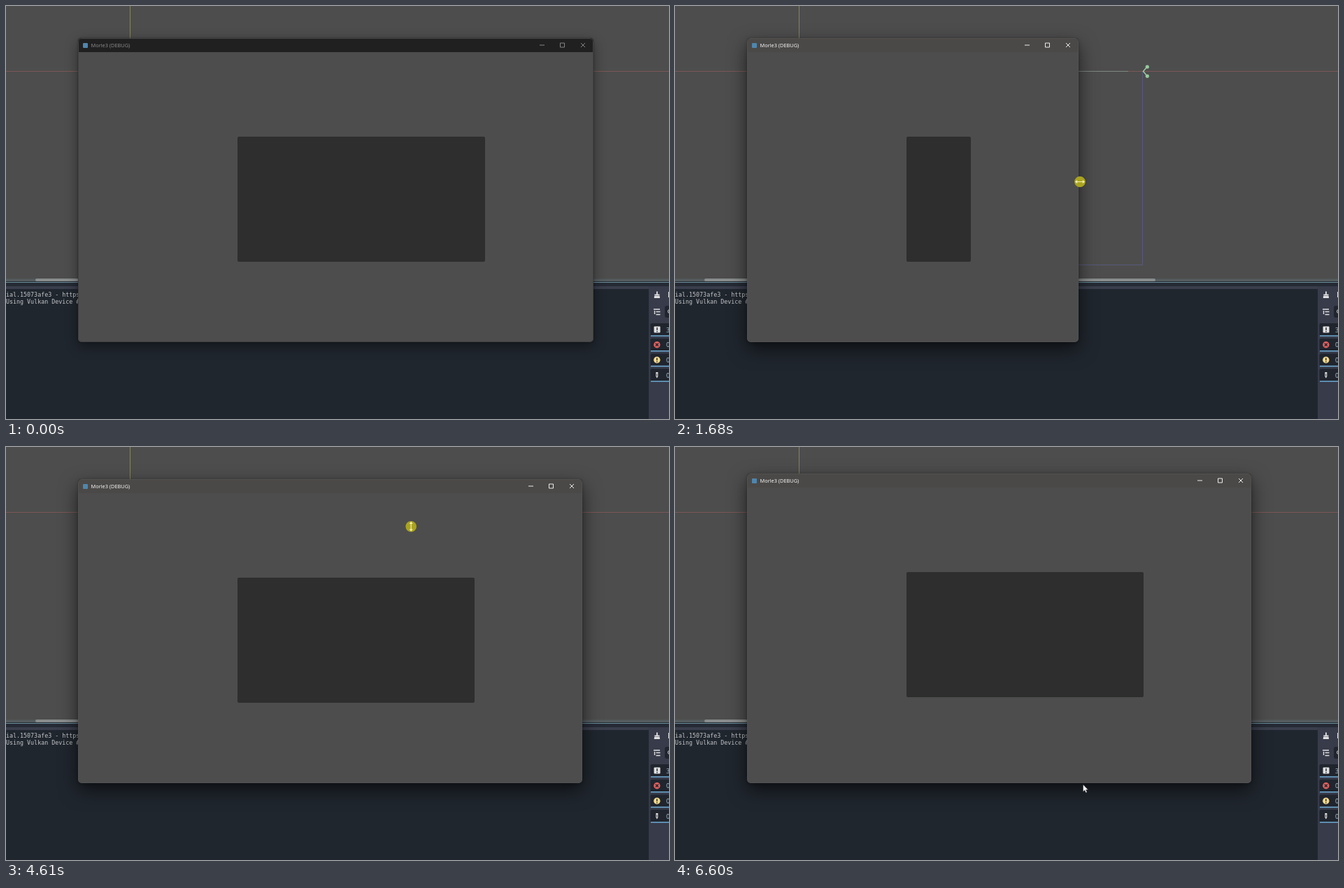
Write an HTML page that moves like this. It is 948 by 591 pixels and loops after 6670 ms.

```html
<!DOCTYPE html>
<html lang="en">
<head>
<meta charset="utf-8">
<title>Window resize</title>
<style>
html, body { margin: 0; width: 100%; height: 100%; overflow: hidden; background: #4d4d4d; }
#stage { position: relative; width: 948px; height: 591px; overflow: hidden; }
svg { position: absolute; left: 0; top: 0; overflow: visible; }
.log { font: 8.33px "DejaVu Sans Mono", "Noto Sans Mono", monospace; fill: #c2c5c8; white-space: pre; }
.count { font: 9px "Noto Sans", sans-serif; fill: #a9c4d0; }
.light { fill: #e0e0e0; }
.mark { fill: none; stroke: #20252e; stroke-width: 1.4; }
#win {
  position: absolute; left: 102.5px;
  border-radius: 5px; box-shadow: 0 6px 18px rgba(0,0,0,.42), 0 0 3px rgba(0,0,0,.35);
}
#win.focus { box-shadow: 0 10px 27px rgba(0,0,0,.58), 0 1px 4px rgba(0,0,0,.3); }
#clip { position: absolute; inset: 0; border-radius: 5px; overflow: hidden; background: #000; }
#clip::after { content: ""; position: absolute; inset: 0; border: 1px solid #414141; border-radius: 5px; }
.focus #clip::after { border-color: rgba(84,84,84,.7); }
#view { position: absolute; left: 0; top: 20px; height: 600px; background: #4d4d4d; }
#panel { position: absolute; left: 228.5px; top: 121px; right: 154.5px; height: 179px; border-radius: 2px; background: #2d2e2d; }
#bar { position: absolute; left: 0; right: 0; top: 0; height: 20px; background: #202020; color: #8f8f8f; }
.focus #bar { background: #4b4947; color: #fff; }
#icon { position: absolute; left: 7px; top: 6.5px; width: 7px; height: 7px; border-radius: 1px; background: #4f86ad; }
#title { position: absolute; left: 19px; top: 0; font: 7.4px/20px "Open Sans", "Noto Sans", sans-serif; white-space: pre; }
#btns { left: auto; right: 0; fill: none; stroke: currentColor; stroke-width: .9; }
#cursor g { display: none; }
#cursor .on { display: inline; }
#size { fill: #fff; stroke: #111; stroke-width: .7; }
.on + #arrow + #size { fill: #f4f0b0; stroke: none; }
</style>
</head>
<body>
<div id="stage">
  <svg width="948" height="591">
    <rect width="948" height="591" fill="#4d4d4d"/>
    <path d="M177.5 0V93" stroke="#86855a"/>
    <path d="M0 93.5H948" stroke="#7d5857"/>
    <path d="M177 93.5H648" stroke="#7e8780"/>
    <path d="M668.5 94V370.5H177" fill="none" stroke="#58587f"/>
    <g stroke="#98c9a0" stroke-width="1.6" fill="#98c9a0">
      <path d="M675 87L669.5 93.5L675 100" fill="none"/>
      <circle cx="675.3" cy="87" r="1.8"/><circle cx="675.3" cy="100.3" r="1.8"/>
    </g>
    <rect y="390.5" width="948" height="3.5" fill="#565d60"/>
    <rect x="42" y="390" width="645" height="4" rx="2" fill="#8a8d8d"/>
    <rect y="394" width="948" height="197" fill="#20262e"/>
    <rect y="395" width="948" height="1" fill="#6f929f"/>
    <rect y="396" width="948" height="5" fill="#252a34"/>
    <rect y="401" width="948" height="4" fill="#3a3e4c"/>
    <rect x="919" y="401" width="29" height="190" fill="#373b4a"/>
    <text class="log" x="0" y="416">ial.15073afe3 - https://</text>
    <text class="log" x="0" y="426">Using Vulkan Device #0: </text>
    <path class="light" d="M930 408.5h1.8v4h2.7v2h-7.2v-2h2.7zM927 415h7.7l.3 3h-8.3zM947 409h1v8h-1z"/>
    <path d="M926 434h9M929.5 437.5h6M929.5 441.5h6M927.5 436v5" fill="none" stroke="#e0e0e0" stroke-width="1.4"/>
    <rect x="942" y="429" width="12" height="17" rx="3" fill="#20252e"/>
    <circle cx="949" cy="437" r="2.5" fill="none" stroke="#d0d0d0"/>
    <g id="filters"></g>
    <rect class="light" x="926.5" y="458.5" width="9" height="9" rx="1"/>
    <circle cx="930.8" cy="484.8" r="4.7" fill="#e0605f"/>
    <circle cx="930.8" cy="506.5" r="4.7" fill="#f5d98c"/>
    <path class="light" d="M929.3 524h3v6l-1.5 2.5l-1.5-2.5z"/>
    <path class="mark" d="M931 460v4M931 465v1.4M928.8 482.8l4 4m0-4l-4 4M930.8 503.5v3.8M930.8 508.5v1.4"/>
    <path d="M930.8 526v4" stroke="#20252e" stroke-width=".8"/>
  </svg>

  <div id="win">
    <div id="clip">
      <div id="view"><div id="panel"></div></div>
      <div id="bar">
        <div id="icon"></div>
        <div id="title">Morle3 (DEBUG)</div>
        <svg id="btns" width="100" height="20">
          <path d="M23 10h7M52.5 7h6v6h-6zM82 7l6 6m0-6l-6 6"/>
        </svg>
      </div>
    </div>
  </div>

  <svg id="cursor" width="1" height="1">
    <g id="press"><circle r="7.8" fill="#aaa31f"/></g>
    <g id="arrow"><path d="M0 0V10.3L2.4 8.2L4 11.8L5.7 11L4.1 7.6H7.2Z" fill="#fff" stroke="#222" stroke-width=".5"/></g>
    <g id="size"><path d="M-7 0L-3.8-2.6V-.6H3.8V-2.6L7 0L3.8 2.6V.6H-3.8V2.6Z"/></g>
  </svg>
</div>

<script>
const $ = id => document.getElementById(id);
const LOOP = 6670, STEPS = 100, LAG = .55;

$("filters").innerHTML = [3, 0, 0, 0].map((n, i) => {
  const y = 454 + i * 21.7;
  return `<rect x="921.5" y="${y}" width="32" height="18.5" rx="2" fill="#20252e"/>
    <rect x="922" y="${y + 17.3}" width="32" height="1.4" fill="#75b5e0"/>
    <text class="count" x="944" y="${y + 12.5}">${n}</text>`;
}).join("");

// Eased pointer moves, with rests between them
const moves = [
  { from: 1, to: 9, x: 852, y: 252 },
  { from: 13, to: 17, x: 842, y: 251.5 },
  { from: 20, to: 24, x: 579, y: 251.5 },
  { from: 34, to: 39, x: 826, y: 251.5 },
  { from: 41, to: 51, x: 583, y: 17 },
  { from: 51, to: 54, x: 597, y: 52 },
  { from: 56, to: 58, x: 594.5, y: 48 },
  { from: 67, to: 72, x: 551, y: 235 },
  { from: 72, to: 80, x: 599, y: 5 },
  { from: 81, to: 84, x: 592, y: 68 },
  { from: 84, to: 87, x: 590, y: 40 },
  { from: 88, to: 94, x: 584, y: 511 },
  { from: 94, to: 97, x: 580, y: 465 },
  { from: 97, to: 99, x: 583.5, y: 483 }
];

const clamp = k => Math.min(1, Math.max(0, k));
const ease = k => k * k * (3 - 2 * k);
const within = (s, a, b) => s >= a && s < b;
const show = (id, on) => $(id).classList.toggle("on", on);

function pointer(s) {
  let x = 930, y = 580;
  for (const m of moves) {
    const k = ease(clamp((s - m.from) / (m.to - m.from)));
    x += (m.x - x) * k;
    y += (m.y - y) * k;
  }
  return { x, y };
}

function draw(s) {
  // Edges trail the pointer; the view is redrawn only after a drag.
  const trail = end => pointer(Math.min(s - LAG, end));
  const right = s < 20 ? 839.5 : trail(40).x - 2;
  const top = s < 70 ? 46 : Math.round(trail(87).y - 2);
  const view = s < 25 ? 839.5 : s < 41 ? 577 : 824;
  const win = $("win");
  win.classList.toggle("focus", s >= 20);
  win.style.top = top + "px";
  win.style.width = right - 102.5 + "px";
  win.style.height = 481 - top + "px";
  $("view").style.width = view - 102.5 + "px";

  const { x, y } = pointer(s);
  const wide = within(s, 16, 41), tall = within(s, 58, 88);
  show("size", wide || tall);
  show("arrow", s > 0 && !wide && !tall);
  show("press", within(s, 20, 29) || within(s, 34, 41) || within(s, 67, 88));
  $("size").setAttribute("transform", tall ? "rotate(90)" : "");
  $("cursor").style.transform = `translate(${x}px, ${y}px)`;
}

const start = performance.now();
function tick() {
  const t = (performance.now() - start) % LOOP;
  draw(Math.min(STEPS - 1, Math.floor(t / LOOP * STEPS + .26)));
  requestAnimationFrame(tick);
}
tick();
</script>
</body>
</html>
```
